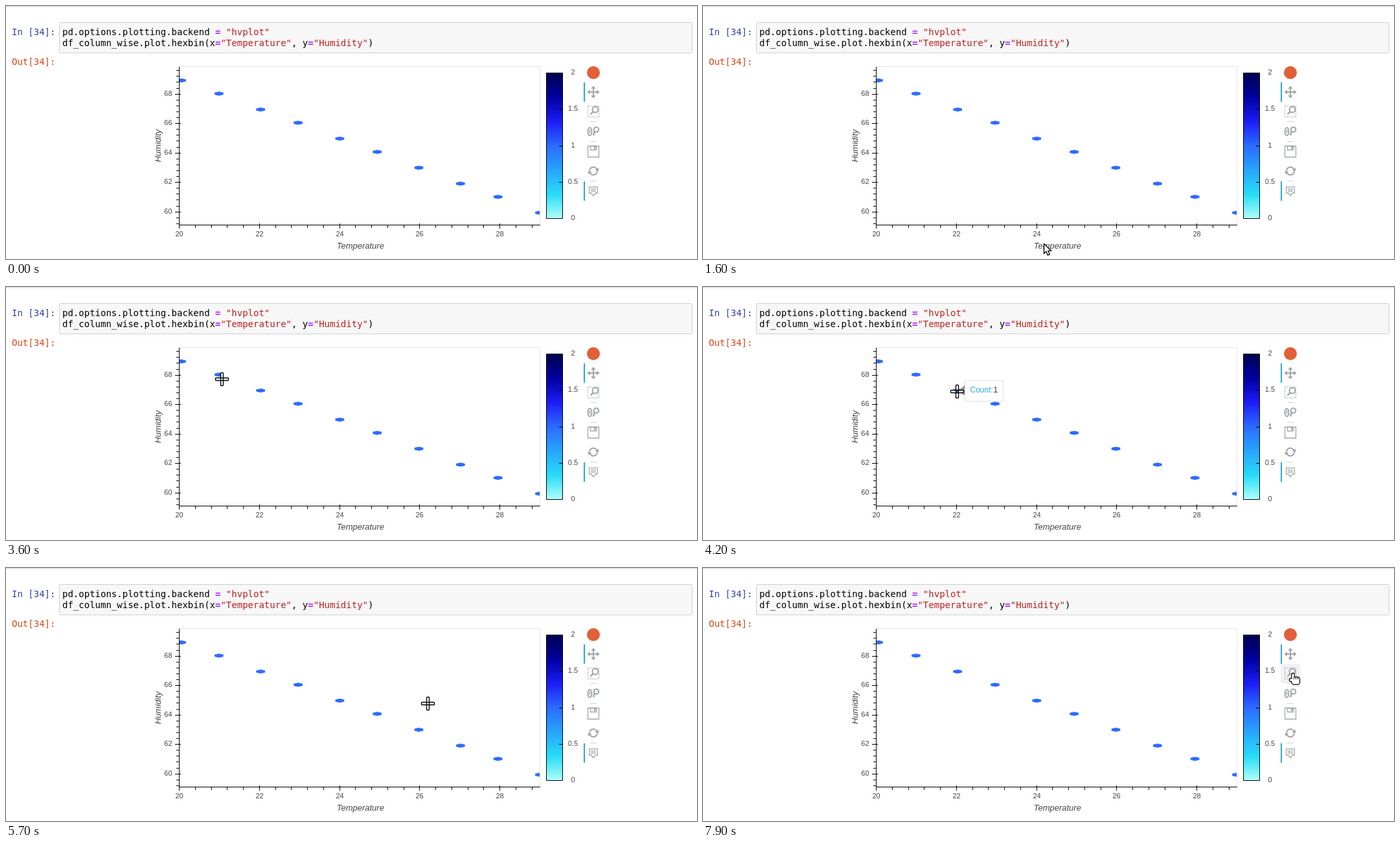
Write an HTML page with a canvas that moves like this. It is 1067 px wide and 391 px high and loops after 8000 ms.

```html
<!DOCTYPE html>
<html lang="en">
<head>
<meta charset="utf-8">
<title>Hexbin plot</title>
<style>
html, body { margin: 0; width: 100%; height: 100%; overflow: hidden; background: #fff; }
canvas { display: block; }
</style>
</head>
<body>
<canvas id="stage" width="1067" height="391"></canvas>
<script>
const ctx = document.getElementById('stage').getContext('2d');
const LOOP = 8000, STEP = 100, TAU = Math.PI * 2;
const MONO = '14px "DejaVu Sans Mono", monospace';
const SANS = '"Liberation Sans", Arial, sans-serif';
const SMALL = '11px ' + SANS, LABEL = 'italic 13px ' + SANS, TIP = '12px ' + SANS;
const plot = { l: 267, t: 94, r: 824, b: 338 };
const GREY = '#a1a6a9', BLUE = '#26aae1', INK = '#444';

// Ten evenly spaced readings, snapped to the hexagon grid
const bins = Array.from({ length: 10 }, (_, i) =>
  [271 + Math.floor(i * 9.58) * 6.43, 115 + Math.floor(i * 5.58) * 4.09]);

// Pointer moves: start and end time, control point, end point
const home = [32, -38];
const moves = [
  [100, 500, 136, 85, 241, 207],
  [600, 1600, 330, 200, 526, 367],
  [1700, 2600, 763, 116, 274, 116],
  [2600, 2900, 272, 115, 271, 115],
  [3000, 3600, 335, 135, 333, 142],
  [3700, 4200, 362, 152, 392, 161],
  [4300, 4900, 421, 170, 451, 179],
  [4900, 5500, 484, 192, 517, 205],
  [5500, 6200, 897, 230, 849, 108],
  [6400, 7100, 856, 205, 854, 312],
  [7200, 7900, 880, 210, 911, 163]
];

function pointer(t) {
  let at = home;
  for (const [from, to, cx, cy, x, y] of moves) {
    if (t < from) break;
    const k = Math.min(1, (t - from) / (to - from)), u = k * k * (3 - 2 * k), v = 1 - u;
    at = [v * v * at[0] + 2 * u * v * cx + u * u * x, v * v * at[1] + 2 * u * v * cy + u * u * y];
  }
  return at.map(Math.round);
}

function binUnder([px, py]) {
  return bins.find(([x, y]) => Math.abs(px - x) < 8 && Math.abs(py - y) < 3.3);
}

function rect(x, y, w, h, fill) {
  ctx.fillStyle = fill;
  ctx.fillRect(x, y, w, h);
}

function text(s, x, y, font, fill, align = 'left') {
  ctx.font = font;
  ctx.fillStyle = fill;
  ctx.textAlign = align;
  ctx.fillText(s, x, y);
}

function paint(fill, stroke, width = 1) {
  if (fill) { ctx.fillStyle = fill; ctx.fill(); }
  if (stroke) { ctx.strokeStyle = stroke; ctx.lineWidth = width; ctx.stroke(); }
}

function poly(points, ...style) {
  ctx.beginPath();
  points.forEach(p => ctx.lineTo(...p));
  ctx.closePath();
  paint(...style);
}

function line(x1, y1, x2, y2, stroke, width) {
  ctx.beginPath();
  ctx.moveTo(x1, y1);
  ctx.lineTo(x2, y2);
  paint(null, stroke, width);
}

function ring(x, y, rx, ry = rx, from = 0, to = TAU) {
  ctx.beginPath();
  ctx.ellipse(x, y, rx, ry, 0, from, to);
  paint(null, GREY, 2);
}

function box(x, y, w, h, fill, stroke, radius = 0, width = 1) {
  ctx.beginPath();
  ctx.roundRect(x + .5, y + .5, w - 1, h - 1, radius);
  paint(fill, stroke, width);
}

// Runs fn in a moved and turned frame
function place(x, y, angle, fn) {
  ctx.save();
  ctx.translate(x, y);
  ctx.rotate(angle);
  fn();
  ctx.restore();
}

// Splits a code line into strings, operators and plain parts
function code(s, x, y) {
  for (const part of s.match(/"[^"]*"|=|[^"=]+/g)) {
    const op = part === '=';
    text(part, x, y, (op ? 'bold ' : '') + MONO, op ? '#aa22ff' : part[0] === '"' ? '#ba2121' : '#000');
    x += ctx.measureText(part).width;
  }
}

function drawCell() {
  rect(0, 0, 1067, 1, '#dedede');
  rect(0, 1, 1067, 1, '#eeeeee');
  box(82, 25, 978, 48, '#f7f7f7', '#cfcfcf', 2);
  text('In [34]:', 9, 45, MONO, '#303f9f');
  text('Out[34]:', 9, 91, MONO, '#d84315');
  code('pd.options.plotting.backend = "hvplot"', 87, 45);
  code('df_column_wise.plot.hexbin(x="Temperature", y="Humidity")', 87, 62);
}

function drawAxes() {
  const { l, t, r, b } = plot;
  rect(l, t - 1, r - l + 1, 1, '#e5e5e5');
  rect(r, t, 1, b - t, '#e5e5e5');
  rect(l, t, 1, b - t + 1, '#000');
  rect(l, b, r - l + 1, 1, '#000');
  for (let i = 0; i <= 22; i++) {
    const x = Math.round(l + i * 24.75), major = i % 5 === 0;
    rect(x, major ? b - 2 : b, 1, major ? 8 : 5, '#000');
    if (major) text(20 + i * .4, x + .5, 356, SMALL, INK, 'center');
  }
  for (let i = -2; i <= 24; i++) {
    const y = Math.round(317.6 - i * 9.1), major = i % 5 === 0;
    rect(l - (major ? 6 : 4), y, major ? 9 : 5, 1, '#000');
    if (major) text(60 + i * .4, 256.5, y + 3, SMALL, INK, 'right');
  }
  text('Temperature', 547.3, 375, LABEL, INK, 'center');
  place(239, 216, -Math.PI / 2, () => text('Humidity', 0, 0, LABEL, INK, 'center'));
}

function drawBins() {
  const w = 6.43, h = 2.73;
  ctx.save();
  ctx.beginPath();
  ctx.rect(plot.l + 1, plot.t, plot.r - plot.l - 1, plot.b - plot.t);
  ctx.clip();
  for (const [x, y] of bins) {
    poly([[x, y - h], [x + w, y - h / 2], [x + w, y + h / 2], [x, y + h], [x - w, y + h / 2], [x - w, y - h / 2]],
      '#2b6bff', '#2b6bff', .8);
  }
  ctx.restore();
}

function drawColorbar() {
  const shades = ['#00004e', '#0000a0', '#1c1cf5', '#2b6bff', '#27a5fd', '#28dcf8', '#b3fff9'];
  const fill = ctx.createLinearGradient(0, 103, 0, 329);
  shades.forEach((c, i) => fill.addColorStop(i / (shades.length - 1), c));
  box(834, 103, 26, 226, fill, '#000');
  for (let i = 0; i <= 4; i++) {
    const y = Math.round(103 + i * 56.25);
    if (i % 4) rect(854, y, 5, 1, '#000');
    text(2 - i / 2, 875.5, y + 3, SMALL, INK, 'center');
  }
}

function magnifier(x, y, r, dx, dy) {
  ring(x, y, r);
  line(x - r * .7, y + r * .7, x - dx, y + dy, GREY, 2.4);
}

function drawTools() {
  ctx.beginPath();
  ctx.arc(907, 103, 10, 0, TAU);
  paint('#e0603a');
  [118, 271].forEach(y => rect(892, y, 2, 30, BLUE));
  [178, 209, 270].forEach(y => rect(902, y, 10, 1, '#d3d3d3'));

  // Pan
  for (let i = 0; i < 4; i++) {
    place(907, 133, i * TAU / 4, () => {
      rect(-1, -7, 2, 7, GREY);
      poly([[0, -9.5], [3.8, -5.2], [-3.8, -5.2]], GREY);
    });
  }

  // Box zoom
  ctx.setLineDash([2, 1.5]);
  box(898, 154, 18, 18, null, GREY);
  ctx.setLineDash([]);
  magnifier(910, 160, 4.5, 7.5, 7.5);

  // Wheel zoom
  ring(901.5, 194, 3, 6);
  line(901.5, 191, 901.5, 196, GREY, 1.6);
  magnifier(911.5, 191, 3.8, 4.5, 9);

  // Save
  box(898, 216, 18, 18, null, GREY, 0, 1.3);
  box(902, 216, 10, 7, null, GREY, 0, 1.3);
  rect(908, 217, 2.5, 4, GREY);

  // Reset
  for (let i = 0; i < 2; i++) {
    place(907, 255, i * Math.PI, () => {
      ring(0, 0, 6, 6, Math.PI * 1.05, Math.PI * 1.85);
      poly([[8.5, -5], [7.5, 1], [2.5, -1.5]], GREY);
    });
  }

  // Hover
  poly([[900.6, 279.6], [913.4, 279.6], [913.4, 289], [910.5, 289], [907, 293.4], [903.5, 289], [900.6, 289]],
    null, GREY, 1.3);
  [282, 284, 286].forEach(y => rect(903, y, 8, 1, GREY));
}

function drawTip(bin) {
  const [x, y] = bin.map(Math.round);
  poly([[x + 1, y], [x + 11, y - 8], [x + 11, y + 8]], '#909599');
  box(x + 11, y - 16, 60, 33, '#fff', '#e0e0e0');
  text('Count:', x + 19.5, y + 3, TIP, BLUE);
  text('1', x + 55.5, y + 3, TIP, '#333');
}

function drawCross() {
  for (let i = 0; i < 4; i++) {
    place(.5, .5, i * TAU / 4, () => box(-10.5, -2.5, 9, 5, '#fff', '#000', 1, 1.4));
  }
}

function drawArrow() {
  poly([[.5, .5], [.5, 15.5], [4, 12.3], [6.4, 18.2], [9.3, 17], [6.9, 11.3], [11.6, 11.3]], '#fff', '#000', 1.3);
}

function drawHand() {
  ctx.beginPath();
  ctx.roundRect(-1.5, 0, 3, 12, 1.5);
  ctx.roundRect(-1.5, 6, 11.5, 10.5, 3);
  ctx.roundRect(-5, 8, 8, 4, 2);
  paint(null, '#000', 2.4);
  paint('#fff');
  [1.5, 4.5, 7.5].forEach(x => line(x, 6, x, 9, '#000', 1));
}

function drawPointer(x, y) {
  const inPlot = x > plot.l && x < plot.r && y > plot.t && y < plot.b;
  place(x, y, 0, inPlot ? drawCross : x >= 892 ? drawHand : drawArrow);
}

function draw(t) {
  const [x, y] = pointer(t);
  rect(0, 0, 1067, 391, '#fff');
  drawCell();
  drawAxes();
  drawBins();
  drawColorbar();
  if (x >= 892 && y >= 148 && y < 209) rect(892, y < 178 ? 148 : 179, 30, 30, '#f2f2f2');
  drawTools();
  // The tooltip trails the pointer by one step
  const bin = binUnder(pointer(t - STEP));
  if (bin) drawTip(bin);
  drawPointer(x, y);
}

const start = performance.now();
function frame() {
  const t = (performance.now() - start) % LOOP;
  draw(Math.floor(t / STEP) * STEP);
  requestAnimationFrame(frame);
}
frame();
</script>
</body>
</html>
```
